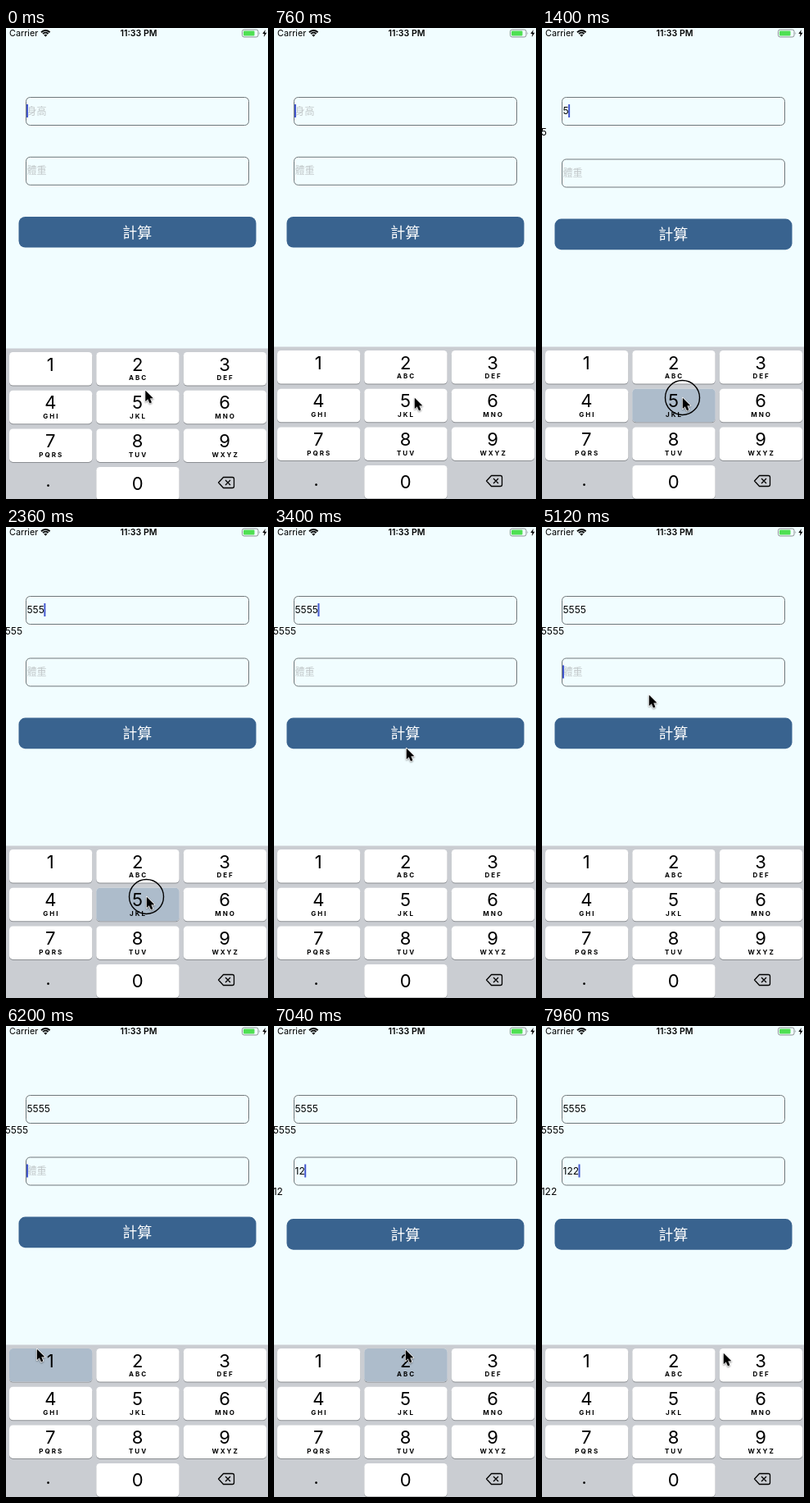
An HTML page with a canvas for the animation above (8000 ms loop, 320 px wide and 574 px high).

```html
<!DOCTYPE html>
<html lang="zh-Hant">
<head>
<meta charset="utf-8">
<style>
html, body { margin: 0; width: 100%; height: 100%; overflow: hidden; background: #f1fdff; }
canvas { display: block; width: 320px; height: 574px; }
</style>
</head>
<body>
<canvas id="stage"></canvas>
<script>
const LOOP = 8000, W = 320, H = 574;
const LATIN = 'Inter, Roboto, sans-serif';
const CJK = '"Noto Sans CJK TC", "Noto Sans CJK", "Noto Sans CJK JP", sans-serif';
const canvas = document.getElementById('stage');
const ctx = canvas.getContext('2d');
const scale = window.devicePixelRatio || 1;
canvas.width = W * scale;
canvas.height = H * scale;

const LETTERS = ['', 'ABC', 'DEF', 'GHI', 'JKL', 'MNO', 'PQRS', 'TUV', 'WXYZ'];
const COLUMNS = [4, 110.3, 216.8];

// Pointer stops: time, x, y
const PATH = [
  [0, 169.5, 441], [300, 169.5, 441], [760, 171, 450], [3220, 171, 450],
  [3400, 161, 269], [3640, 160, 262], [4080, 149, 166], [4720, 149, 166],
  [5120, 130, 204], [5300, 120, 222], [5900, 37, 393], [6320, 37, 393],
  [6680, 160, 394], [7560, 160, 394], [7960, 221, 398]
];
const TAPS = [
  { key: 5, down: 940, up: 1160 }, { key: 5, down: 1340, up: 1550 },
  { key: 5, down: 1740, up: 2020 }, { key: 5, down: 2300, up: 2560 },
  { down: 4260, up: 4640 },
  { key: 1, down: 5980, up: 6190 }, { key: 2, down: 6760, up: 6990 },
  { key: 2, down: 7220, up: 7460 }
];
const TYPE_DELAY = 40, FOCUS_TIME = 4640;
const CARET_GAPS = [[280, 620], [3560, 3860], [4260, 4640], [5380, 5740]];

const clamp = v => Math.max(0, Math.min(1, v));

function pointerAt(t) {
  const i = PATH.findIndex(p => p[0] > t);
  if (i < 0) return PATH[PATH.length - 1].slice(1);
  const [t0, x0, y0] = PATH[i - 1], [t1, x1, y1] = PATH[i];
  const k = (t - t0) / (t1 - t0), e = k * k * (3 - 2 * k);
  return [x0 + (x1 - x0) * e, y0 + (y1 - y0) * e];
}

function typedBetween(from, to) {
  return TAPS.filter(p => p.key && p.up >= from && p.up + TYPE_DELAY <= to).map(p => p.key).join('');
}

function caretAlpha(t) {
  return CARET_GAPS.reduce((a, [off, on]) =>
    Math.min(a, t < off ? 1 : Math.max(1 - (t - off) / 120, t >= on ? 1 : 0)), 1);
}

function pressAmount(key, t) {
  return Math.max(0, ...TAPS.filter(p => p.key === key && t >= p.down)
    .map(p => clamp(1 - (t - p.up - 80) / 60)));
}

function box(x, y, w, h, r, fill, stroke) {
  ctx.beginPath();
  ctx.roundRect(x, y, w, h, r);
  if (fill) { ctx.fillStyle = fill; ctx.fill(); }
  if (stroke) { ctx.strokeStyle = stroke; ctx.lineWidth = 1; ctx.stroke(); }
}

function write(str, x, y, font, color = '#000', align = 'left', spacing = 0) {
  ctx.font = font;
  ctx.fillStyle = color;
  ctx.textAlign = align;
  ctx.letterSpacing = spacing + 'px';
  ctx.fillText(str, x, y);
}

function shape(path, fill, stroke, width = 1) {
  const p = new Path2D(path);
  ctx.lineJoin = 'round';
  if (stroke) { ctx.strokeStyle = stroke; ctx.lineWidth = width; ctx.stroke(p); }
  if (fill) { ctx.fillStyle = fill; ctx.fill(p); }
}

function drawStatusBar() {
  write('Carrier', 4, 10.3, '400 10.8px ' + LATIN);
  write('11:33 PM', 162, 10.3, '600 10.6px ' + LATIN, '#000', 'center');
  ctx.strokeStyle = '#000';
  ctx.lineWidth = 1.9;
  for (const r of [7.2, 4.4]) {
    ctx.beginPath();
    ctx.arc(48.3, 10.2, r, -Math.PI * 0.76, -Math.PI * 0.24);
    ctx.stroke();
  }
  shape('M48.3 10.8L46.3 8.6Q48.3 7 50.3 8.6Z', '#000');
  box(288.5, 2, 19.5, 9, 2.3, null, '#8b9293');
  box(290, 3.5, 13.5, 6, 1, '#4fe053');
  shape('M309.5 5Q311 6.5 309.5 8Z', '#8b9293');
  shape('M316.8 2L313.3 7H315.6L314.8 11L318.5 5.8H316.1Z', '#000');
}

function drawField(y, value, placeholder, caret) {
  box(24.5, y + 0.5, 272, 34, 5, null, '#70777a');
  if (value) write(value, 25.5, y + 21.3, '400 12px ' + LATIN);
  else write(placeholder, 25.5, y + 21.5, '400 12px ' + CJK, '#c2c8ca');
  if (caret > 0) {
    ctx.font = '400 12px ' + LATIN;
    ctx.letterSpacing = '0px';
    ctx.globalAlpha = caret;
    ctx.fillStyle = '#4358cf';
    ctx.fillRect(25 + ctx.measureText(value).width, y + 9, 2, 16);
    ctx.globalAlpha = 1;
  }
}

function drawForm(t) {
  const height = typedBetween(0, Math.min(t, FOCUS_TIME));
  const weight = typedBetween(FOCUS_TIME, t);
  const second = height ? 159.5 : 156.8;
  const button = 230 + (height ? 2.6 : 0) + (weight ? 2.5 : 0);
  const caret = caretAlpha(t), label = '400 12px ' + LATIN;
  drawField(84, height, '身高', t < FOCUS_TIME ? caret : 0);
  drawField(second, weight, '體重', t < FOCUS_TIME ? 0 : caret);
  write(height, -1.3, 130.7, label);
  write(weight, -1.3, 206.2, label);
  box(15.5, button, 290, 37.6, 8, '#39638f');
  write('計算', 160.3, button + 25.8, '500 18px ' + CJK, '#fff', 'center');
}

function drawKey(n, x, y, pressed) {
  box(x, y + 1, 101.3, 40.5, 4.5, '#8b8e92');
  box(x, y, 101.3, 40.5, 4.5, '#fff');
  if (pressed) {
    ctx.globalAlpha = pressed;
    box(x, y, 101.3, 40.5, 4.5, '#adbccb');
    ctx.globalAlpha = 1;
  }
  const cx = x + 50.3;
  write(String(n), cx, y + (n ? 22.6 : 27.6), '400 22px ' + LATIN, '#000', 'center');
  if (n > 1) write(LETTERS[n - 1], cx + 1, y + 34.4, '700 8px ' + LATIN, '#000', 'center', 2);
}

function drawKeyboard(t) {
  ctx.save();
  ctx.translate(0, 2 * (1 - clamp(t / 120)));
  ctx.fillStyle = '#cacdd2';
  ctx.fillRect(0, 388.5, W, 190);
  for (let n = 1; n <= 9; n++) {
    const i = n - 1;
    drawKey(n, COLUMNS[i % 3], 393 + 46.7 * Math.floor(i / 3), pressAmount(n, t));
  }
  drawKey(0, COLUMNS[1], 533, 0);
  write('.', 51.5, 557.5, '500 20px ' + LATIN, '#000', 'center');
  shape('M265.5 545.5H276.5Q278.5 545.5 278.5 547.5V556.5Q278.5 558.5 276.5 558.5H265.5L259.5 552Z' +
    'M268 549L274 555M274 549L268 555', null, '#000', 1.3);
  ctx.restore();
}

function drawPointer(t) {
  const [x, y] = pointerAt(t);
  if (TAPS.some(p => t >= p.down && t < p.up)) {
    ctx.beginPath();
    ctx.arc(x + 0.5, y + 0.5, 21, 0, 2 * Math.PI);
    ctx.strokeStyle = '#000';
    ctx.lineWidth = 1.4;
    ctx.stroke();
  }
  ctx.save();
  ctx.translate(x, y);
  ctx.shadowColor = 'rgba(0,0,0,.3)';
  ctx.shadowBlur = 2 * scale;
  ctx.shadowOffsetY = scale;
  shape('M.8 .8V14L3.8 11.2L6 16.3L8.4 15.2L6.2 10.3H10.3Z', '#000', '#fff', 1.8);
  ctx.restore();
}

function frame(now) {
  const t = now % LOOP;
  ctx.setTransform(scale, 0, 0, scale, 0, 0);
  ctx.fillStyle = '#f1fdff';
  ctx.fillRect(0, 0, W, H);
  drawStatusBar();
  drawForm(t);
  drawKeyboard(t);
  drawPointer(t);
}

const start = performance.now();
function tick() {
  frame(performance.now() - start);
  requestAnimationFrame(tick);
}
tick();
</script>
</body>
</html>
```
